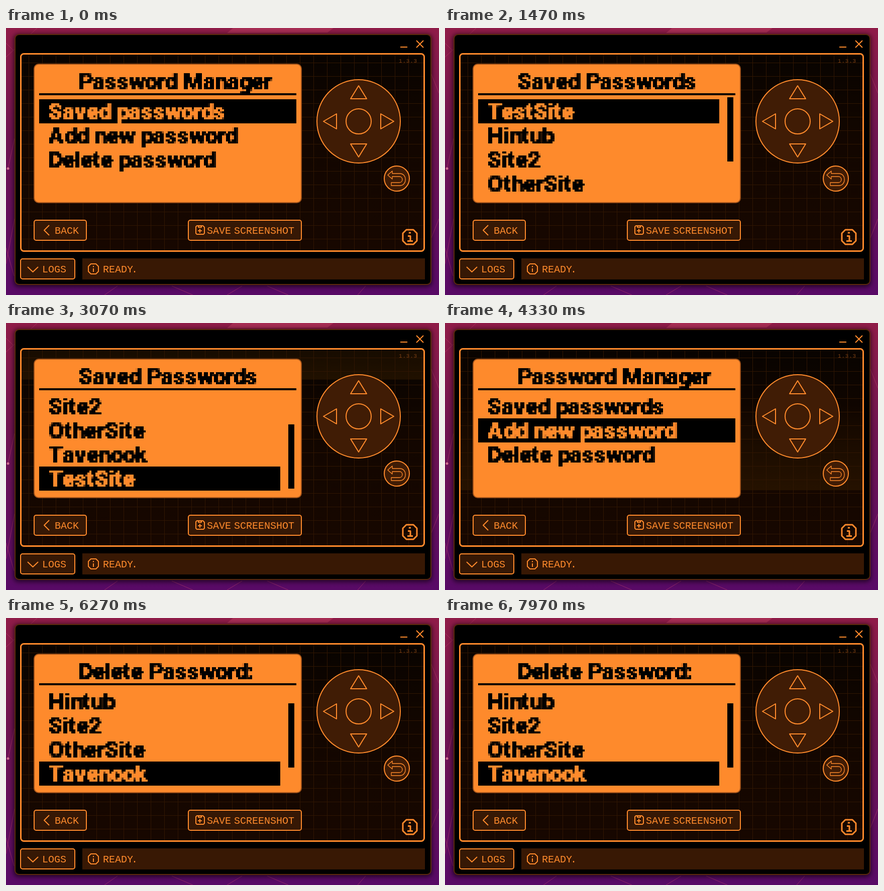
These frames come from a looping animation (862 px wide and 532 px high, 8 s). An HTML page with a canvas:

```html
<!DOCTYPE html>
<html lang="en">
<head>
<meta charset="utf-8">
<title>Password manager remote</title>
<style>
  html, body { margin: 0; width: 862px; height: 532px; overflow: hidden; background: #000; }
  svg, canvas { position: absolute; display: block; }
  svg { left: 0; top: 0; }
  canvas { left: 66px; top: 82px; width: 512px; height: 256px; image-rendering: pixelated; }
  .line { fill: none; stroke: #fe8a2c; stroke-width: 2; stroke-linejoin: round; }
  .button { fill: #361805; stroke: #fe8a2c; stroke-width: 2; }
  .pad { fill: #401c05; stroke: #fe8a2c; stroke-width: 2; }
  text { fill: #fe8a2c; font: 20px "Liberation Mono", monospace; word-spacing: -6px; }
  .version { fill: #7a4014; font-size: 11px; letter-spacing: .8px; }
</style>
</head>
<body>
<svg width="862" height="532" viewBox="0 0 862 532">
  <defs>
    <linearGradient id="sky" x2="0" y2="1">
      <stop stop-color="#8f1c48"/>
      <stop offset=".4" stop-color="#701450"/>
      <stop offset="1" stop-color="#580a66"/>
    </linearGradient>
    <linearGradient id="panelFill" x2="0" y2="1">
      <stop stop-color="#080300"/>
      <stop offset=".4" stop-color="#120600"/>
      <stop offset="1" stop-color="#170700"/>
    </linearGradient>
    <linearGradient id="glow" x2="0" y2="1">
      <stop stop-color="#3a2000" stop-opacity="0"/>
      <stop offset="1" stop-color="#3a2000" stop-opacity=".45"/>
    </linearGradient>
    <pattern id="grid" width="27" height="27" x="18" y="42" patternUnits="userSpaceOnUse">
      <path d="M.5 0V27M0 .5H27" stroke="#301602" fill="none"/>
    </pattern>
    <clipPath id="panelClip"><rect x="30" y="52" width="802" height="392" rx="5"/></clipPath>
    <filter id="shadow" x="-5%" y="-5%" width="110%" height="110%"><feGaussianBlur stdDeviation="5"/></filter>
  </defs>

  <rect width="862" height="532" fill="url(#sky)"/>
  <g stroke="#c0406c" stroke-opacity=".55" fill="none">
    <path d="M0 58L62 0M0 30L14 44M0 438L16 494M0 470L17 380M4 280L17 220M846 90L862 130M846 420L862 380"/>
    <path d="M196 532L222 514M330 514L372 532M440 532L470 514M520 514L562 532M700 532L716 514"/>
  </g>
  <path d="M440 10L452 0H652L640 9Z" fill="#b83a5c" opacity=".6"/>
  <circle cx="4" cy="280" r="2.5" fill="#d07090"/>

  <rect x="15" y="12" width="833" height="504" rx="9" opacity=".6" filter="url(#shadow)"/>
  <rect x="18" y="13" width="828" height="498" rx="8" stroke="#5c2a0c" stroke-width="2"/>
  <path class="line" d="M785 38H799M817 25L831 39M831 25L817 39"/>

  <g clip-path="url(#panelClip)">
    <rect x="28" y="50" width="806" height="396" fill="url(#panelFill)"/>
    <rect id="scan" x="28" width="806" height="170" fill="url(#glow)"/>
    <rect x="28" y="50" width="806" height="396" fill="url(#grid)"/>
  </g>
  <rect class="line" x="29.5" y="51.5" width="803" height="393" rx="6" style="stroke-width:3"/>
  <text class="version" x="782" y="69">1.3.3</text>

  <rect x="56" y="72" width="532" height="276" rx="9" fill="#fe8a2c" stroke="#a0521a" stroke-width="2"/>

  <circle class="pad" cx="702" cy="186" r="83"/>
  <circle class="line" cx="702" cy="186" r="25"/>
  <path class="line" d="M702 115L718 141H686ZM702 257L686 231H718ZM632 186L658 171V201ZM772 186L746 171V201Z"/>
  <circle class="pad" cx="778" cy="300" r="25"/>
  <path class="line" style="stroke-width:1.3"
    d="M760 293L769 285V290H784C799 290 799 314 784 314H767V308H783C791 308 791 296 783 296H769V301Z"/>

  <rect class="button" x="56" y="383" width="104" height="40" rx="4"/>
  <path class="line" d="M86 393L76 403L86 413"/>
  <text x="97" y="410">BACK</text>

  <rect class="button" x="363" y="383" width="225" height="40" rx="4"/>
  <path class="line" d="M380 394H392L395 397V409L393 411H380L378 409V396Z"/>
  <path class="line" d="M383 394V397H389V394M386 400V408M382 404H390"/>
  <text x="400" y="410">SAVE SCREENSHOT</text>

  <path class="line" style="stroke-width:3" d="M797 402H811L818 409V424L811 431H797L790 424V409Z"/>
  <path class="line" style="stroke-width:3" d="M802 408H806M800 414.500H805V424M799 424.500H810"/>

  <rect class="button" x="29" y="460" width="108" height="40" rx="4"/>
  <path class="line" d="M43 476L53.500 486L64 476"/>
  <text x="72" y="487">LOGS</text>

  <rect x="152" y="459" width="682" height="42" fill="#381804"/>
  <path class="line" d="M169 470H179L184 475V485L179 490H169L164 485V475Z"/>
  <path class="line" d="M174 474V476.500M174 479V486"/>
  <text x="193" y="487">READY<tspan dx="-3">.</tspan></text>
</svg>
<canvas id="lcd" width="128" height="64"></canvas>

<script>
const DURATION = 8000;
const CELL = 4;
const PRESS = 320; // ms between repeated presses
const sites = ["TestSite", "Hintub", "Site2", "OtherSite", "Tavenook", "TestSite"];
const screens = {
  menu: { title: "Password Manager", items: ["Saved passwords", "Add new password", "Delete password"] },
  saved: { title: "Saved Passwords", items: sites },
  remove: { title: "Delete Password:", items: sites }
};
// Each visit opens a screen, then steps down from the first item to the last one listed.
const visits = [
  { start: 0, screen: "menu", firstPress: DURATION, last: 0 },
  { start: 1100, screen: "saved", firstPress: 1660, last: 5 },
  { start: 3700, screen: "menu", firstPress: 4180, last: 2 },
  { start: 4820, screen: "remove", firstPress: 5180, last: 4 }
];

const lcd = document.getElementById("lcd").getContext("2d");
const scan = document.getElementById("scan");
const large = document.createElement("canvas");
large.width = 128 * CELL;
large.height = 64 * CELL;
const ink = large.getContext("2d", { willReadFrequently: true });
ink.font = "bold 45px Roboto, sans-serif";

// Places letters on whole cells; the second pass thickens the stems.
function write(text, column, baseline) {
  for (const letter of text) {
    const x = column * CELL - 2;
    ink.fillText(letter, x, baseline * CELL);
    ink.fillText(letter, x + 1, baseline * CELL);
    column += Math.round(ink.measureText(letter).width / CELL);
  }
}

// Averages each cell's coverage and sharpens it into a pixel.
function pixelate() {
  const source = ink.getImageData(0, 0, large.width, large.height).data;
  const image = lcd.createImageData(128, 64);
  for (let y = 0; y < 64; y++) for (let x = 0; x < 128; x++) {
    let sum = 0;
    for (let j = 0; j < CELL; j++) for (let i = 0; i < CELL; i++)
      sum += source[((y * CELL + j) * large.width + x * CELL + i) * 4 + 3];
    const coverage = sum / (255 * CELL * CELL);
    image.data[(y * 128 + x) * 4 + 3] = 255 * Math.min(1, Math.max(0, (coverage - .36) * 8));
  }
  lcd.putImageData(image, 0, 0);
}

function drawScreen(name, selected) {
  const { title, items } = screens[name];
  const top = Math.max(0, selected - 3);
  const scrolls = items.length > 4;
  ink.clearRect(0, 0, large.width, large.height);
  write(title, 20, 10);
  items.slice(top, top + 4).forEach((item, row) => write(item, 5, 25 + row * 12));
  pixelate();
  lcd.fillRect(0, 12, 128, 1);
  if (scrolls) lcd.fillRect(124, 14 + top * 8, 3, 32);
  lcd.globalCompositeOperation = "xor";
  lcd.fillRect(0, 15 + (selected - top) * 12, scrolls ? 120 : 128, 12);
  lcd.globalCompositeOperation = "source-over";
}

let shown;
function frame() {
  const time = performance.now() % DURATION;
  const { screen, firstPress, last } = visits.findLast(visit => visit.start <= time);
  const presses = Math.floor((time - firstPress) / PRESS) + 1;
  const selected = Math.min(last, Math.max(0, presses));
  const state = screen + selected;
  if (state !== shown) {
    drawScreen(screen, selected);
    shown = state;
  }
  const edge = 333 + (time - 4330) * .175;
  scan.setAttribute("y", edge - 170);
  requestAnimationFrame(frame);
}
frame();
</script>
</body>
</html>
```
